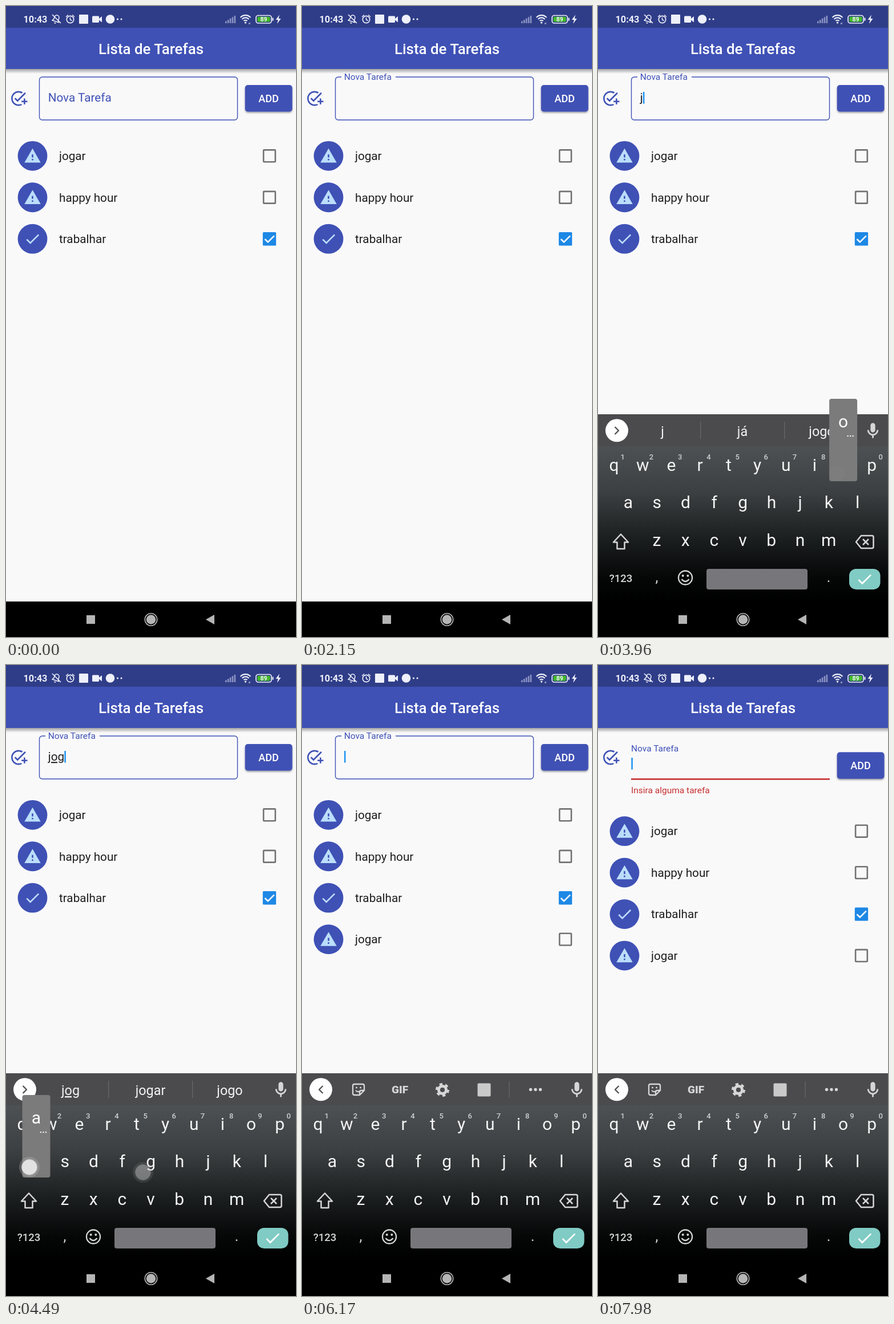
An HTML page for the animation above (8000 ms loop, 508 px wide and 1102 px high).

```html
<!DOCTYPE html>
<html lang="pt">
<head>
<meta charset="utf-8">
<title>Lista de Tarefas</title>
<style>
html, body { margin: 0; width: 100%; height: 100%; overflow: hidden; background: #f9f9fa; }
svg { display: block; width: 508px; height: 1102px; font-family: Roboto, sans-serif; }
.mid { text-anchor: middle; }
.line { fill: none; stroke-linejoin: round; }
</style>
</head>
<body>
<svg id="stage" viewBox="0 0 508 1102"></svg>
<script>
const LOOP = 8000;
const INDIGO = '#3f51b5', BLUE = '#1e88e5', PALE = '#bbdefb', GREY = '#d6d6d6';
const PRESS_FADE_IN = 60, PRESS_FADE_OUT = 200;

const CHECK = 'M9 16.17 4.83 12l-1.42 1.41L9 19 21 7l-1.41-1.41z';
const WARNING = 'M1 21h22L12 2zm12-3h-2v-2h2zm0-4h-2v-4h2z';
const ADD_TASK = 'M22 5.18 10.59 16.6l-4.24-4.24 1.41-1.41 2.83 2.83 10-10zM12 20c-4.41 0-8-3.59-8-8s3.59-8 8-8c1.57 0 3.04.46 4.28 1.25l1.45-1.45C16.1 2.67 14.13 2 12 2 6.48 2 2 6.48 2 12s4.48 10 10 10c1.73 0 3.36-.44 4.78-1.22l-1.5-1.5c-1 .46-2.11.72-3.28.72zm7-5h-3v2h3v3h2v-3h3v-2h-3v-3h-2z';
const MIC = 'M12 14c1.66 0 3-1.34 3-3V5c0-1.66-1.34-3-3-3S9 3.34 9 5v6c0 1.66 1.34 3 3 3zm5-3c0 2.76-2.24 5-5 5s-5-2.24-5-5H5c0 3.53 2.61 6.43 6 6.92V21h2v-3.08c3.39-.49 6-3.39 6-6.92z';

// Presses on the glass; those with a key also type a letter on release.
const presses = [
  { down: 1740, up: 1860, x: 232, y: 162 },
  { down: 3650, up: 3735, x: 342, y: 882, key: 'j' },
  { down: 3960, up: 4045, x: 418, y: 816, key: 'o' },
  { down: 4270, up: 4380, x: 240, y: 886, key: 'g' },
  { down: 4430, up: 4540, x: 41, y: 877, key: 'a' },
  { down: 4700, up: 4790, x: 166, y: 815, key: 'r' },
  { down: 5470, up: 5670, x: 462, y: 157, button: true },
  { down: 6930, up: 7070, x: 461, y: 160, button: true }
];
const FOCUS = 1900, KEYBOARD = 2310, CURSOR = 2520, SUBMIT = 5700, ERROR = 7110;
const typed = presses.filter(p => p.key);
const blinkStarts = [CURSOR, ...typed.map(p => p.up), SUBMIT];

const suggestions = {
  j: ['j', 'já', 'jogo'],
  jo: ['jo', 'jogo', 'jogar'],
  jog: ['jog', 'jogar', 'jogo'],
  joga: ['joga', 'jogar', 'jogador'],
  jogar: ['jogar', 'jogaram', 'jogarem']
};

const clamp = v => Math.max(0, Math.min(1, v));
const mix = (a, b, p) => a + (b - a) * p;
const progress = (t, start, length) => clamp((t - start) / length);
const smooth = p => p * p * (3 - 2 * p);
const easeOut = p => 1 - (1 - p) ** 3;

const text = (x, y, size, content, fill, extra = '') =>
  `<text x="${x}" y="${y}" font-size="${size}" fill="${fill}" ${extra}>${content}</text>`;
const rect = (x, y, w, h, fill, r = 0, extra = '') =>
  `<rect x="${x}" y="${y}" width="${w}" height="${h}" rx="${r}" fill="${fill}" ${extra}/>`;
const circle = (x, y, r, fill, extra = '') =>
  `<circle cx="${x}" cy="${y}" r="${r}" fill="${fill}" ${extra}/>`;
const icon = (d, x, y, scale, fill) =>
  `<path d="${d}" fill="${fill}" fill-rule="evenodd" transform="translate(${x} ${y}) scale(${scale}) translate(-12 -12)"/>`;
const line = (d, color, width, extra = '') =>
  `<path class="line" d="${d}" stroke="${color}" stroke-width="${width}" ${extra}/>`;
const group = (id, content, extra = '') => `<g id="${id}" ${extra}>${content}</g>`;

const keys = {};
[['qwertyuiop', 28, 812], ['asdfghjkl', 53, 877], ['zxcvbnm', 103, 943]].forEach(([row, x, y]) =>
  [...row].forEach((k, i) => keys[k] = { x: x + i * 50.2, y }));

function statusBar() {
  const ink = '#eef0fa';
  const bars = [0, 1, 2, 3, 4].map(i =>
    rect(384 + i * 3.9, 26.5 - i * 2.4, 2.6, 3.5 + i * 2.4, '#8b93c2')).join('');
  const wifi = [4, 8, 12].map(r => {
    const d = r * .74;
    return line(`M${419.5 - d} ${29 - d}A${r} ${r} 0 0 1 ${419.5 + d} ${29 - d}`, ink, 2.2);
  }).join('');
  return rect(0, 0, 508, 38, '#2f3d88')
    + text(30.5, 28.8, 16.3, '10:43', ink, 'font-weight="700"')
    + `<g transform="rotate(18 88 23)">${line('M82 27h12l-2-3v-4a4 4 0 0 0-8 0v4zM86.5 30h3', ink, 1.6)}</g>`
    + line('M81 15 96 30', ink, 1.6)
    + circle(112.5, 23.5, 6.2, 'none', `stroke="${ink}" stroke-width="1.7"`)
    + line('M112.5 20v4l3 1.5M105 19l4-3.5M120 19l-4-3.5', ink, 1.5)
    + rect(128, 15, 16, 16, ink, 1)
    + rect(151, 17.5, 12, 11.5, ink, 1.5) + `<path d="M163 22l5-4v10.500l-5-4z" fill="${ink}"/>`
    + circle(182.500, 23, 7.8, ink) + circle(195.500, 23, 1.6, ink) + circle(202, 23, 1.6, ink)
    + bars + wifi + circle(419.5, 29, 1.7, ink) + text(425, 32, 6, 'e', ink)
    + rect(438, 16.500, 27, 13.500, 'none', 4, `stroke="${ink}" stroke-width="1.7"`)
    + rect(440.3, 18.8, 22.4, 9, '#43b82c', 2) + rect(466.500, 20.500, 2, 5.500, ink, 1)
    + text(451.500, 27.2, 10.500, '89', ink, 'class="mid" font-weight="700"')
    + `<path d="M479 15.500l-6.500 8.500h4l-1.500 7 6.500-9h-4z" fill="${ink}"/>`;
}

function task(title, index, done) {
  const y = 261.8 + index * 72.45;
  const box = done
    ? rect(449.8, y - 11.7, 23.300, 23.4, BLUE, 1.5) + line(`M453.500 ${y + .3}l5.300 5.300 11-11`, '#fff', 2.6)
    : rect(451.1, y - 10.4, 20.7, 20.8, 'none', 1, 'stroke="#737373" stroke-width="2.600"');
  return circle(46.500, y, 25.9, INDIGO) + icon(done ? CHECK : WARNING, 46.500, y, 1.293, PALE)
    + text(93, y + 7.300, 20.7, title, '#1f1f1f') + box;
}

function toolbarIcons() {
  return line('M36.500 735l-6.500 6.500 6.500 6.500', '#555', 2.4)
    + line('M92 732h14q3 0 3 3v8l-8 8h-9q-3 0-3-3v-13q0-3 3-3zM109 743h-5q-3 0-3 3v5', GREY, 2.300)
    + circle(95.500, 738, 1.5, GREY) + circle(102.500, 738, 1.5, GREY)
    + line('M94 743q4 4 7 1', GREY, 1.8)
    + text(171.500, 747.800, 19, 'GIF', GREY, 'class="mid" font-weight="900"')
    + circle(246, 742, 6.6, 'none', `stroke="${GREY}" stroke-width="5"`)
    + circle(246, 742, 10, 'none', `stroke="${GREY}" stroke-width="4" pathLength="12" stroke-dasharray="1"`)
    + rect(307.500, 730.500, 23, 23, '#c9c9c9', 2)
    + rect(362.5, 727, 1.2, 28, '#69696c')
    + [400.500, 409, 417.500].map(x => circle(x, 741.5, 2.7, GREY)).join('');
}

function suggestionBar() {
  const words = [113, 253, 392].map((x, i) =>
    text(x, 751, 23.4, '', '#f3f3f3', `class="mid word" ${i ? '' : 'text-decoration="underline"'}`)).join('');
  return line('M29.500 735l6.500 6.500-6.500 6.500', '#555', 2.4)
    + rect(179, 726, 1.2, 30, '#69696c') + rect(326, 726, 1.2, 30, '#69696c') + words;
}

function keyboard() {
  const letters = Object.entries(keys).map(([k, { x, y }]) =>
    text(x, y, 30, k, '#f4f4f4', 'class="mid"')).join('');
  const digits = [...'1234567890'].map((n, i) =>
    text(43.300 + i * 50.2, 792, 13, n, '#cfcfcf', 'class="mid" font-weight="500"')).join('');
  return rect(0, 713, 508, 57, '#4b4b4e') + rect(0, 769, 508, 333, 'url(#keys)')
    + circle(33, 741.3, 20, '#fff')
    + group('tools', toolbarIcons()) + group('words', suggestionBar())
    + icon(MIC, 481.500, 742, 1.38, GREY)
    + letters + digits
    + line('M40 922.500l13 14h-6.500v11.500h-13v-11.500h-6.500z', GREY, 2.500)
    + line('M461 925h19q2.500 0 2.500 2.500v17q0 2.500-2.500 2.500h-19l-9-11zM464 931l10 10M474 931l-10 10', GREY, 2.500)
    + text(40, 1005.500, 18.500, '?123', GREY, 'class="mid" font-weight="500"')
    + text(103, 1006, 25, ',', GREY, 'class="mid"') + text(404, 1006, 25, '.', GREY, 'class="mid"')
    + circle(153, 998.500, 12, 'none', `stroke="${GREY}" stroke-width="2.300"`)
    + circle(148.700, 995, 2, GREY) + circle(157.300, 995, 2, GREY)
    + line('M146.500 1001q6.500 8 13 0', GREY, 2.300)
    + rect(190, 983, 177, 36, '#77767a', 4)
    + rect(440, 983, 54.500, 36, '#80cbc4', 12) + icon(CHECK, 467, 1001, 1.34, '#fff')
    + group('popup', rect(-24.500, -126, 49, 144, '#7b7b7c', 4)
      + text(0, -76, 30, '', '#fff', 'class="mid" id="popupKey"')
      + [8, 12.500, 17].map(x => circle(x, -61, 1.3, '#eee')).join(''));
}

const dots = presses.map((p, i) =>
  group('press' + i, circle(p.x, p.y, 18, '#bbb', 'opacity=".3"')
    + circle(p.x, p.y, 13.5, '#eee', 'opacity=".88" stroke="#ccc" stroke-width="1"'))).join('');

const stage = document.getElementById('stage');
stage.innerHTML = `<defs>
  <linearGradient id="keys" gradientUnits="userSpaceOnUse" x1="0" y1="769" x2="0" y2="1040">
    <stop offset="0" stop-color="#4d5153"/><stop offset=".3" stop-color="#3b3f41"/>
    <stop offset=".6" stop-color="#1b1e1f"/><stop offset=".85" stop-color="#050606"/><stop offset="1"/>
  </linearGradient>
  <linearGradient id="fall" x2="0" y2="1">
    <stop offset="0" stop-opacity=".35"/><stop offset="1" stop-opacity="0"/>
  </linearGradient>
  <filter id="shadow" x="-20%" y="-20%" width="140%" height="160%">
    <feDropShadow dx="0" dy="2" stdDeviation="1.6" flood-opacity=".38"/>
  </filter>
  <clipPath id="aboveNav"><rect width="508" height="1040"/></clipPath>
  <clipPath id="buttonShape"><rect x="418.700" y="138" width="82.800" height="46.500" rx="5"/></clipPath>
</defs>`
  + rect(0, 0, 508, 1102, '#f9f9fa')
  + rect(0, 110, 508, 8, 'url(#fall)') + rect(0, 38, 508, 72, INDIGO) + statusBar()
  + text(254, 83.700, 25.87, 'Lista de Tarefas', '#fff', 'class="mid" font-weight="500"')
  + icon(ADD_TASK, 22, 161.500, 1.293, INDIGO)
  + line('', INDIGO, 1.4, 'id="outline"')
  + rect(58, 198, 348, 2.6, '#c62f2f', 0, 'id="underline"')
  + text(0, 0, 20.7, 'Nova Tarefa', INDIGO, 'id="label"')
  + text(73.700, 167.2, 20.7, '', '#1f1f1f', 'id="entry" text-decoration="underline"')
  + rect(0, 150, 2.6, 20.500, '#2196f3', 0, 'id="cursor"')
  + text(58, 224, 15.500, 'Insira alguma tarefa', '#c62f2f', 'id="error"')
  + group('button', rect(418.700, 138, 82.800, 46.500, INDIGO, 5, 'filter="url(#shadow)"')
    + `<g clip-path="url(#buttonShape)">${circle(461, 158, 0, '#fff', 'id="ripple"')}</g>`
    + text(460, 167.500, 18.1, 'ADD', '#fff', 'class="mid" font-weight="500"'))
  + group('list', task('jogar', 0) + task('happy hour', 1) + task('trabalhar', 2, true)
    + group('added', task('jogar', 3)))
  + rect(0, 1040, 508, 62, '#000')
  + `<g clip-path="url(#aboveNav)">${group('keyboard', keyboard())}</g>`
  + rect(141, 1064, 15, 15, '#b5b5b5')
  + circle(254, 1071.500, 10.700, 'none', 'stroke="#b5b5b5" stroke-width="1.600"') + circle(254, 1071.500, 8.300, '#b5b5b5')
  + '<path d="M350 1071.500l15-8.500v17z" fill="#b5b5b5"/>'
  + dots;

const $ = id => document.getElementById(id);
const set = (id, attrs) => Object.entries(attrs).forEach(([k, v]) => $(id).setAttribute(k, v));
const show = (id, on) => set(id, { visibility: on ? 'inherit' : 'hidden' });
const words = document.querySelectorAll('.word');

function pressAlpha(t, p) {
  return progress(t, p.down, PRESS_FADE_IN) * (1 - progress(t, p.up, PRESS_FADE_OUT));
}

function drawField(t, value) {
  const floated = smooth(progress(t, FOCUS, 167));
  const failed = t >= ERROR;
  const left = mix(116, 69, floated), right = mix(116, 164, floated);
  set('outline', { d: `M${left} 124H63.500a5 5 0 0 0-5 5V194a5 5 0 0 0 5 5H400.500a5 5 0 0 0 5-5V129a5 5 0 0 0-5-5H${right}` });
  show('outline', !failed);
  show('underline', failed);
  set('label', {
    x: failed ? 58 : 73.700,
    y: failed ? 151.200 : mix(167.2, 128.700, floated),
    'font-size': mix(20.7, 15.500, floated)
  });

  $('entry').textContent = value;
  const width = value ? $('entry').getComputedTextLength() : 0;
  const blink = blinkStarts.filter(s => s <= t).pop();
  show('cursor', blink !== undefined && (t - blink) % 1000 < 500);
  set('cursor', { x: (failed ? 58.300 : 73.900) + width, y: failed ? 162 : 150 });

  const reveal = progress(t, ERROR, 167);
  set('error', { opacity: reveal, y: mix(220, 224, reveal) });
  set('button', { transform: `translate(0 ${failed ? 14.300 : 0})` });
  set('list', { transform: `translate(0 ${failed ? 28.400 : 0})` });
}

function drawKeyboard(t, value) {
  set('keyboard', { transform: `translate(0 ${327 * (1 - easeOut(progress(t, KEYBOARD, 340)))})` });
  show('keyboard', t >= KEYBOARD);
  show('tools', !value);
  show('words', !!value);
  words.forEach((w, i) => w.textContent = value ? suggestions[value][i] : '');
  const held = typed.find(p => t >= p.down && t < p.up + 40);
  show('popup', !!held);
  if (held) {
    const { x, y } = keys[held.key];
    set('popup', { transform: `translate(${x} ${y})` });
    $('popupKey').textContent = held.key;
  }
}

function drawPresses(t) {
  presses.forEach((p, i) => set('press' + i, { opacity: pressAlpha(t, p) }));
  const tap = presses.find(p => p.button && t >= p.down && t < p.up + 250);
  set('ripple', {
    r: tap ? 60 * easeOut(progress(t, tap.down, 300)) : 0,
    opacity: tap ? .18 * (1 - progress(t, tap.up, 250)) : 0
  });
}

function update(t) {
  const value = t < SUBMIT ? typed.filter(p => p.up <= t).map(p => p.key).join('') : '';
  drawField(t, value);
  show('added', t >= SUBMIT);
  drawKeyboard(t, value);
  drawPresses(t);
}

const start = performance.now();
function frame() {
  update((performance.now() - start) % LOOP);
  requestAnimationFrame(frame);
}
frame();
</script>
</body>
</html>
```
